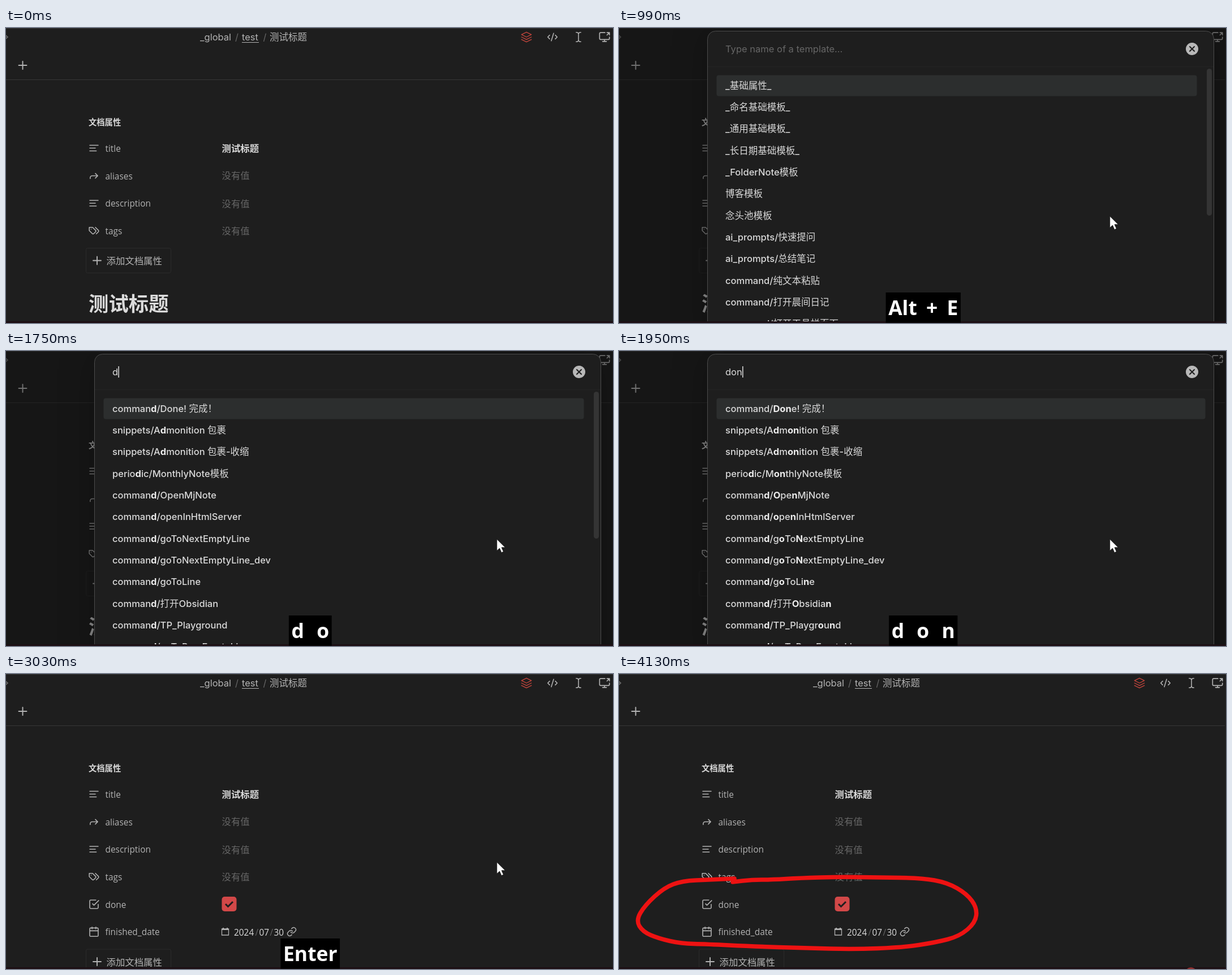
Animation, 1073 px wide and 522 px high, one loop 4.63 s. Source, as an HTML page:

```html
<!DOCTYPE html>
<html lang="zh-CN">
<head>
<meta charset="utf-8">
<style>
html, body { margin: 0; width: 100%; height: 100%; overflow: hidden; background: #1e1e1e; }
svg { display: block; }
text { font: 16.5px Inter, "Noto Sans CJK SC", sans-serif; fill: #b3b3b3; white-space: pre; }
.prop { font: 15.4px "Open Sans", "Noto Sans CJK SC", sans-serif; }
.cjk { font: 500 16.4px "Noto Sans CJK SC", sans-serif; }
.none { font-weight: 400; fill: #666; }
.value { font-weight: 700; fill: #dadada; }
.small { font-size: 14.3px; }
.big { font-size: 35.4px; }
.date { fill: #dadada; }
.dim { fill: #666; }
.item { font-weight: 500; fill: #dadada; }
.item tspan { font-weight: 700; fill: #ececec; }
.key { font: 700 35.5px "Open Sans", sans-serif; fill: #fff; }
.icon { fill: none; stroke: #b3b3b3; stroke-width: 1.9; stroke-linecap: round; stroke-linejoin: round; }
#box { filter: drop-shadow(0 2px 30px rgba(0,0,0,.25)); }
</style>
</head>
<body>
<svg id="stage" width="1073" height="522" viewBox="0 0 1073 522"></svg>
<script>
const LOOP = 4630;
const $ = id => document.getElementById(id);
const show = (id, on) => $(id).style.display = on ? '' : 'none';
const text = (x, y, s, cls = '') => `<text x="${x}" y="${y}" class="${cls}">${s}</text>`;
// 24-unit icon centred on (x, y)
const icon = (x, y, d, scale = .83, attrs = '') =>
  `<path class="icon" transform="translate(${x} ${y}) scale(${scale}) translate(-12 -12)" d="${d}" ${attrs}/>`;

const PLUS = 'M5 12h14M12 5v14';
const LINES = 'M21 6H3M15 12H3M17 18H3';
const ARROW = 'm15 17 5-5-5-5M4 18v-2a4 4 0 0 1 4-4h12';
const TAGS = 'M9 5H2v7l6.3 6.3c.9.9 2.5.9 3.4 0l3.6-3.6c.9-.9.9-2.5 0-3.4zM6 9h.01M15 5l6.3 6.3a2.4 2.4 0 0 1 0 3.4L17 19';
const CHECK = 'm9 11 3 3L22 4M21 12v7a2 2 0 0 1-2 2H5a2 2 0 0 1-2-2V5a2 2 0 0 1 2-2h11';
const CALENDAR = 'M5 4h14a2 2 0 0 1 2 2v14a2 2 0 0 1-2 2H5a2 2 0 0 1-2-2V6a2 2 0 0 1 2-2zM16 2v4M8 2v4M3 10h18';
const LINK = 'M10 13a5 5 0 0 0 7.5.5l3-3a5 5 0 0 0-7-7l-1.8 1.7M14 11a5 5 0 0 0-7.5-.5l-3 3a5 5 0 0 0 7 7l1.8-1.7';

const prop = (y, d, name, value = '') => icon(155.5, y - .5, d) + text(175.5, y + 5.5, name, 'prop') + value;
const empty = y => text(381.5, y + 6, '没有值', 'cjk none');

const header = `
  <path d="M0 .5H1073M0 91.5H1071" stroke="#363636"/>
  <path class="icon" d="M-3 11l6 5-6 5" style="stroke:#666"/>
  ${text(343, 22, '_global')}${text(405, 22, '/', 'dim')}${text(417, 22, 'test')}
  ${text(454.5, 22, '/', 'dim')}${text(466, 22, '测试标题')}
  <path d="M417 25.5h30" stroke="#b3b3b3"/>
  ${icon(920, 16, 'M12 2 2 7l10 5 10-5zM2 17l10 5 10-5M2 12l10 5 10-5', .87, 'style="stroke:#c2453c;stroke-width:1.6"')}
  ${icon(966, 16, 'm18 16 4-4-4-4M6 8l-4 4 4 4M14.5 4l-5 16')}
  ${icon(1012, 16, 'M17 22h-1a4 4 0 0 1-4-4V6a4 4 0 0 1 4-4h1M7 22h1a4 4 0 0 0 4-4M7 2h1a4 4 0 0 1 4 4')}
  ${icon(1058, 16, 'M13 3H4a2 2 0 0 0-2 2v10a2 2 0 0 0 2 2h16a2 2 0 0 0 2-2v-3M8 21h8M12 17v4M17 8l5-5M17 3h5v5', .87)}
  ${icon(29.5, 66, PLUS, 1)}`;

const props = text(146, 172.3, '文档属性', 'cjk value small')
  + prop(213, LINES, 'title', text(381.5, 219, '测试标题', 'cjk value'))
  + prop(262, ARROW, 'aliases', empty(261))
  + prop(310.5, LINES, 'description', empty(310.5))
  + prop(359, TAGS, 'tags', empty(358.5));

const added = prop(408, CHECK, 'done') + prop(456.5, CALENDAR, 'finished_date') + `
  <rect x="381.5" y="394" width="26" height="26" rx="5" fill="#d24848"/>
  <path d="M388 407l4.5 4.5 8.5-8.5" fill="none" stroke="#1e1e1e" stroke-width="3"/>
  <path d="M381.5 451h12v11h-12zM381 451.5h13" fill="none" stroke="#b3b3b3" stroke-width="1.3"/>
  <path d="M381 452h13M384 449v2M391 449v2" stroke="#b3b3b3" stroke-width="2"/>
  ${text(403, 462.5, '2024', 'prop date')}${text(440.5, 462.5, '/', 'prop dim')}
  ${text(447.5, 462.5, '07', 'prop date')}${text(466.5, 462.5, '/', 'prop dim')}
  ${text(473.5, 462.5, '30', 'prop date')}${icon(505, 456, LINK, .78)}`;

const below = `<rect x="141.5" y="389.5" width="150" height="44" rx="3" fill="none" stroke="#2b2b2b"/>
  ${icon(161, 411.5, PLUS, 1)}${text(177.5, 418, '添加文档属性', 'cjk')}
  ${text(146, 500.5, '测试标题', 'cjk value big')}`;

const modal = `<rect width="1073" height="522" fill="#0a0a0a" opacity=".4"/>
  <rect id="box" x="156.5" y="5.5" width="895" rx="14" fill="#1e1e1e" stroke="#4c4c4c"/>
  <path d="M157 68.5h894" stroke="#242424"/>
  <circle cx="1013" cy="37" r="11" fill="#b8b8b8"/>
  <path d="M1009 33l8 8m0-8l-8 8" stroke="#1e1e1e" stroke-width="2" stroke-linecap="round"/>
  <rect id="bar" x="1039" y="72" width="9" height="260" rx="4.5" fill="#343434"/>
  <rect id="pick" x="172.5" y="83.5" height="37" rx="4"/>
  <text id="query" x="188" y="42.5"></text>
  <rect id="caret" y="27" width="1.5" height="20" fill="#e0e0e0"/>
  <g id="rows"></g>`;

// Hand-drawn loop, smoothed through segment midpoints
const loop = [[204,362],[160,364],[112,366],[80,378],[46,409],[30,436],[42,456],[70,468],[110,477],[155,478],
  [235,482],[330,485],[415,487],[500,484],[560,475],[602,464],[630,440],[633,414],[615,389],[580,369],
  [535,361],[460,360],[390,359],[320,361],[270,364],[235,364],[201,368]];
const ring = 'M' + loop[0] + loop.slice(1, -1).map((p, i) =>
  `Q${p} ${p.map((v, k) => (v + loop[i + 2][k]) / 2)}`).join('') + 'L' + loop.at(-1);

$('stage').innerHTML = `${header}${props}<g id="added">${added}</g><g id="below">${below}</g>
  <g id="modal">${modal}</g>
  <path id="ring" d="${ring}" pathLength="1" fill="none" stroke="#ee1212" stroke-width="7.5"
    stroke-linecap="round" stroke-linejoin="round"/>
  <rect y="519" width="1073" height="3" fill="#1c0f14"/>
  <circle id="dot" cx="1011" cy="529.5" r="10.5" fill="#8f3030"/>
  <g id="cap"><rect id="capBox" y="468" height="53.5"/><text id="keys" class="key"></text></g>
  <path id="pointer" d="M0 0v20.5l4.8-4.4 3.3 7.6 3.6-1.6-3.3-7.4h6.4z" fill="#fff" stroke="#111" stroke-width=".8"/>`;

const command = s => s.split(' ').map(n => 'command/' + n);
const ALL = ['_基础属性_', '_命名基础模板_', '_通用基础模板_', '_长日期基础模板_', '_FolderNote模板', '博客模板', '念头池模板',
  'ai_prompts/快速提问', 'ai_prompts/总结笔记', ...command('纯文本粘贴 打开晨间日记 打开工具栏页面')];
const DON = ['command/Done! 完成！', 'snippets/Admonition 包裹', 'snippets/Admonition 包裹-收缩', 'periodic/MonthlyNote模板',
  ...command('OpenMjNote openInHtmlServer goToNextEmptyLine goToNextEmptyLine_dev goToLine 打开Obsidian TP_Playground goToPrevEmptyLine')];
const DONE = [DON[0], ...command('goToNextEmptyLine goToNextEmptyLine_dev goToLine'), DON[3],
  ...command('goToPrevEmptyLine fast-start/plugins-core-new OpenMjNote openInHtmlServer fast-start/plugins-omnisearch')];

// Bold a whole match if there is one, else the letters in order
function mark(s, query) {
  const low = s.toLowerCase(), at = low.indexOf(query);
  let k = 0;
  return [...s].map((c, i) => {
    const hit = at >= 0 ? i >= at && i < at + query.length : low[i] === query[k] && ++k;
    return hit ? `<tspan>${c}</tspan>` : c;
  }).join('').replaceAll('</tspan><tspan>', '');
}

let drawn;
function setQuery(q) {
  if (q === drawn) return;
  drawn = q;
  const list = !q ? ALL : q === 'done' ? DONE : DON, long = q.length < 2;
  $('rows').innerHTML = list.map((s, i) => text(188, 107.7 + 38.33 * i, mark(s, q), 'item')).join('');
  const field = $('query');
  field.textContent = q || 'Type name of a template...';
  field.style.fill = q ? '#dadada' : '#666';
  show('caret', q);
  $('caret').setAttribute('x', 188.3 + field.getComputedTextLength());
  show('bar', long);
  $('pick').setAttribute('width', long ? 849 : 864);
  $('box').setAttribute('height', q === 'done' ? 477 : 560);
}

function setKeys(s, gap, y = 508) {
  const keys = $('keys');
  show('cap', s);
  if (!s) return;
  keys.textContent = s;
  keys.style.wordSpacing = gap + 'px';
  const w = keys.getComputedTextLength();
  keys.setAttribute('x', 537.8 - w / 2);
  keys.setAttribute('y', y);
  $('capBox').setAttribute('x', 533.3 - w / 2);
  $('capBox').setAttribute('width', w + 9);
}

// Last entry whose start time has passed
const at = (table, t) => table.findLast(e => e[0] <= t);
const QUERY = [[0, ''], [1620, 'd'], [1820, 'do'], [1950, 'don'], [2080, 'done']];
const KEYS = [[0, ''], [920, 'Alt + E', 7], [1550, 'Alt + E\u2009 d', 7], [1750, 'd o', 13],
  [1880, 'd o n', 13], [2080, 'd o n e', 13], [2490, 'o e', 13, 502],
  [2560, 'e Enter', 13], [3030, 'Enter', 0], [3300, '']];
const POINTER = [[110, 1024, 466], [180, 985, 425], [250, 942, 376], [310, 912, 345],
  [450, 893, 337], [520, 876, 334], [580, 867.7, 333]];

function draw(now) {
  const t = now % LOOP, done = t >= 2690;
  show('modal', t >= 920 && t < 2560);
  $('modal').style.opacity = t < 990 ? .5 : 1;
  setQuery(at(QUERY, t)[1]);
  $('pick').setAttribute('fill', t < 2490 ? '#2c2e2e' : '#2f2f2f');
  setKeys(...at(KEYS, t).slice(1));

  show('added', done);
  $('below').setAttribute('transform', `translate(0 ${done ? 97.5 : 0})`);

  const p = at(POINTER, t);
  show('pointer', p && t < 3300);
  if (p) $('pointer').setAttribute('transform', `translate(${p[1]} ${p[2]})`);

  const part = Math.min(1, Math.floor((t - 3300) / 68.8) / 9);
  show('ring', part > 0);
  $('ring').style.strokeDasharray = part < 1 ? `${Math.max(0, part)} 2` : 'none';
  show('dot', t >= 4130);
}

function frame() {
  draw(performance.now());
  requestAnimationFrame(frame);
}
frame();
</script>
</body>
</html>
```
